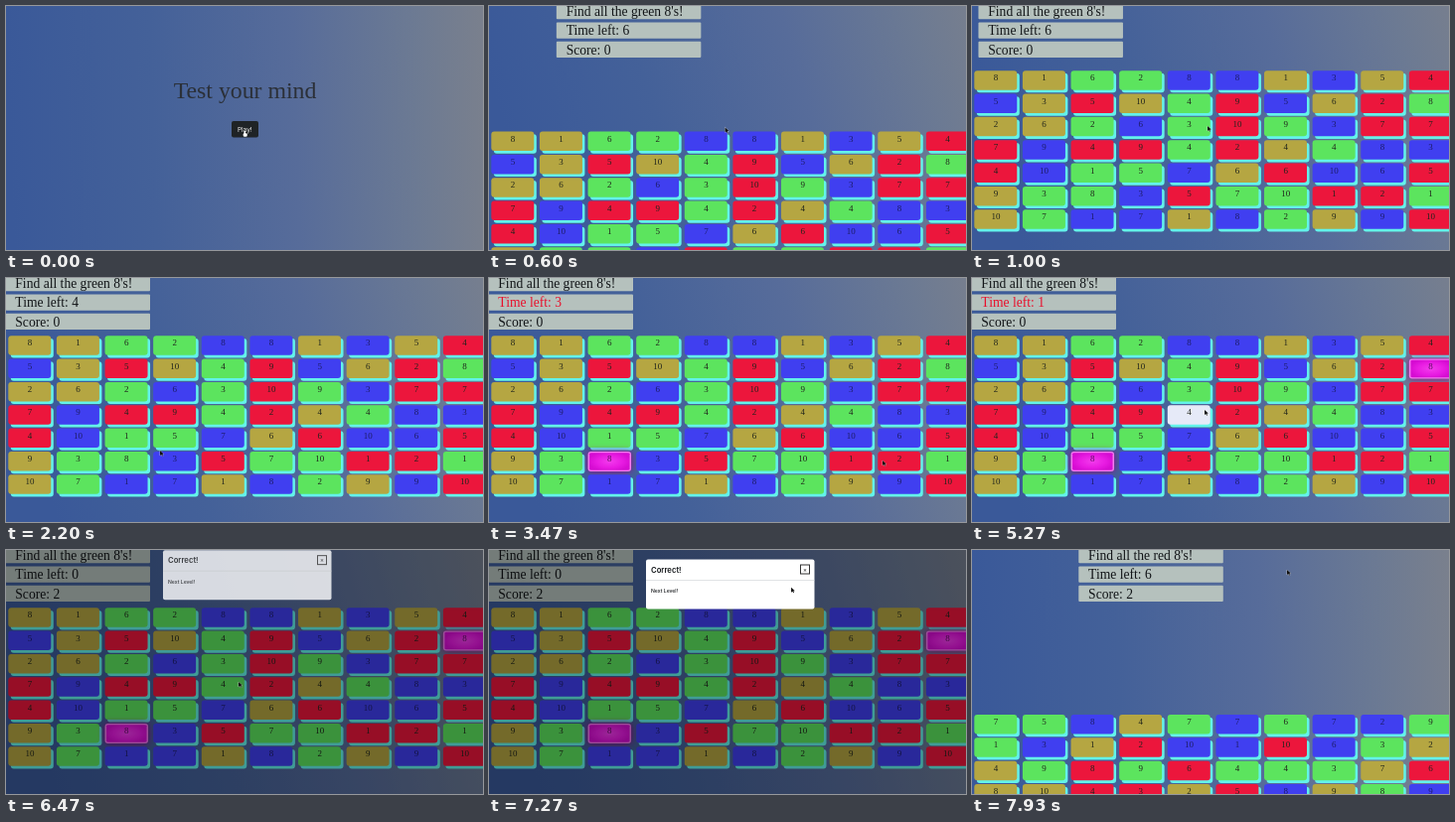
These frames come from a looping animation (480 px wide and 246 px high, 8000 ms). An HTML page with a canvas:

```html
<!DOCTYPE html>
<html lang="en">
<head>
<meta charset="utf-8">
<title>Test your mind</title>
<style>
html, body { margin: 0; width: 480px; height: 246px; overflow: hidden; background: #4a669d; }
canvas { display: block; }
</style>
</head>
<body>
<canvas id="stage" width="480" height="246"></canvas>
<script>
const ctx = document.getElementById('stage').getContext('2d');
const SERIF = '"Liberation Serif", serif', SANS = 'Inter, sans-serif';
const COLORS = { y: '#b5a642', g: '#5ce45e', r: '#ec163c', b: '#403ff0' };
const START = 255, END = 6200, POPUP = 6350, CLOSE = 7550, NEXT = 7700;

// Each card is a digit (0 stands for 10) and a colour letter.
const LEVELS = [
  ['8y1y6g2g8b8b1y3b5y4r', '5b3y5r0y4g9r5b6y2r8g', '2y6y2g6b3g0r9g3b7r7r',
   '7r9b4r9r4g2r4y4g8b3b', '4r0b1g5g7b6y6r0b6b5r', '9y3g8g3b5r7g0g1r2r1g',
   '0y7g1b7b1y8b2g9y9b0r'],
  ['7g5g8b4y7g7b6g7b2b9g', '1g3b1y2r0b1b0r6b3g2y', '4y9g8r9g6r4g4g3g7y6r',
   '8y0y4r3r2y5r8b9y8g9b']
];

// Pointer path: time, x, y
const PATH = [[0, 239, 126], [START, 239, 126], [800, 237, 121], [1300, 237, 121],
  [2200, 155, 174], [2420, 127, 186], [2750, 127, 186], [3470, 396, 184],
  [3850, 458, 90], [4430, 458, 90], [5200, 234, 133], [6850, 234, 133],
  [7430, 317, 20], [8000, 317, 20]];

const clamp = v => Math.max(0, Math.min(1, v));
const ramp = (t, from, len) => clamp((t - from) / len);

function bezier(x1, y1, x2, y2) {
  const at = (a, b, s) => 3 * a * s * (1 - s) ** 2 + 3 * b * s * s * (1 - s) + s ** 3;
  return x => {
    let lo = 0, hi = 1;
    for (let i = 0; i < 20; i++) {
      const mid = (lo + hi) / 2;
      if (at(x1, x2, mid) < x) lo = mid; else hi = mid;
    }
    return at(y1, y2, hi);
  };
}
const ease = bezier(.25, .1, .25, 1);
const easeOut = bezier(0, 0, .58, 1);
const easeInOut = bezier(.42, 0, .58, 1);

function rect(x, y, w, h, r, fill) {
  ctx.fillStyle = fill;
  ctx.beginPath();
  ctx.roundRect(x, y, w, h, r);
  ctx.fill();
}

function text(str, x, y, font, fill, align = 'left') {
  ctx.font = font;
  ctx.fillStyle = fill;
  ctx.textAlign = align;
  ctx.fillText(str, x, y);
}

function background(tilt) {
  const g = ctx.createLinearGradient(0, tilt, 480, -tilt);
  g.addColorStop(0, '#3a5999');
  g.addColorStop(.3, '#446199');
  g.addColorStop(.6, '#576c9a');
  g.addColorStop(.85, '#6c7a93');
  g.addColorStop(1, '#7a808d');
  ctx.fillStyle = g;
  ctx.fillRect(0, 0, 480, 246);
}

function intro() {
  text('Test your mind', 240.5, 93, '23.8px ' + SERIF, '#2b3038', 'center');
  rect(227, 116, 27, 16.5, 2, '#1f2326');
  text('Play!', 240.3, 126.5, '6.5px ' + SANS, '#f4f4f4', 'center');
}

function card(x, y, num, color, state) {
  if (state === 'picked') {
    ctx.save();
    ctx.shadowColor = '#a0008c';
    ctx.shadowBlur = 7;
    rect(x, y, 43.5, 20, 3, '#f27cee');
    ctx.restore();
    const g = ctx.createRadialGradient(0, 0, 0, 0, 0, 1);
    g.addColorStop(0, '#f23cec');
    g.addColorStop(.6, '#e81ce2');
    g.addColorStop(1, '#d60cd2');
    ctx.save();
    ctx.translate(x + 21.75, y + 10);
    ctx.scale(21.5, 10);
    rect(-.94, -.88, 1.88, 1.76, .1, g);
    ctx.restore();
  } else {
    rect(x + 2.5, y + 2.7, 43, 19.5, 3, '#63f3ea');
    rect(x, y, 43, 19.5, 3, state === 'wrong' ? '#e6eaf8' : COLORS[color]);
  }
  const ink = state === 'picked' ? '#5c1060' : color === 'b' ? '#1c1c66' : '#20241c';
  text(num === '0' ? '10' : num, x + 21.7, y + 10, '9px ' + SERIF, ink, 'center');
}

function board(t, level) {
  const slide = 170 * (1 - ease(ramp(t, level ? NEXT : START, 1000)));
  const left = level ? 6 : t < END ? 6 - Math.max(0, Math.floor((t - 175) / 1011)) : 0;
  const score = t < END ? 0 : 2;
  const lines = [`Find all the ${level ? 'red' : 'green'} 8's!`, 'Time left: ' + left, 'Score: ' + score];

  lines.forEach((line, i) => {
    const y = -3 + i * 19.4;
    rect(slide - .5, y, 145.5, 16.3, 1, '#b5c1bd');
    const urgent = i === 1 && left > 0 && left < 4;
    text(line, slide + 9.3, y + 13, '13.6px ' + SERIF, urgent ? '#e8102c' : '#121518');
  });

  LEVELS[level].forEach((row, r) => {
    for (let c = 0; c < 10; c++) {
      const picked = !level && (r === 5 && c === 2 && t > 2500 || r === 1 && c === 9 && t > 3930);
      const wrong = !level && r === 3 && c === 4 && t > 5230 && t < END;
      card(2.3 + c * 48.62, 58.2 + slide + r * 23.35, row[2 * c], row[2 * c + 1],
        picked ? 'picked' : wrong ? 'wrong' : '');
    }
  });
}

function modal(t) {
  const shade = ramp(t, END, 150) - ramp(t, NEXT, 150);
  ctx.fillStyle = `rgba(0,0,0,${.36 * shade})`;
  ctx.fillRect(0, 0, 480, 246);

  const alpha = ramp(t, POPUP, 150) - ramp(t, CLOSE, 140);
  if (alpha <= 0) return;
  const shown = easeOut(ramp(t, POPUP, 300)) - easeOut(ramp(t, CLOSE, 300));
  ctx.save();
  ctx.globalAlpha = alpha;
  ctx.translate(158, 9.5 - 22 * (1 - shown));
  rect(0, 0, 169.5, 50, 2, '#fff');
  rect(0, 20.7, 169.5, .6, 0, '#c4c8cc');
  text('Correct!', 5, 13.3, '600 7.7px ' + SANS, '#15181b');
  text('Next Level!', 5, 33.8, '500 5.1px ' + SANS, '#15181b');
  ctx.strokeStyle = '#333';
  ctx.lineWidth = 1;
  ctx.strokeRect(155.5, 5.5, 9, 9);
  text('×', 160, 12, '6px ' + SANS, '#222', 'center');
  ctx.restore();
}

function pointer(t) {
  const i = PATH.findIndex(p => p[0] > t);
  const [t0, x0, y0] = PATH[i - 1], [t1, x1, y1] = PATH[i];
  const k = easeInOut((t - t0) / (t1 - t0));
  ctx.save();
  ctx.translate(x0 + (x1 - x0) * k, y0 + (y1 - y0) * k);
  if (t < START) {
    rect(.5, 0, 1.5, 4, .7, '#fff');
    rect(-.3, 2.3, 4, 3.4, 1.2, '#fff');
  } else {
    ctx.beginPath();
    [[0, 0], [0, 5], [1.3, 4], [2.2, 5.7], [3, 5.3], [2.2, 3.7], [3.8, 3.6]].forEach(p => ctx.lineTo(...p));
    ctx.closePath();
    ctx.strokeStyle = 'rgba(255,255,255,.6)';
    ctx.lineWidth = .8;
    ctx.stroke();
    ctx.fillStyle = '#111';
    ctx.fill();
  }
  ctx.restore();
}

function draw(now) {
  const t = now % 8000;
  const level = t < NEXT ? 0 : 1;
  background(t < START || level ? 8 : 70);
  if (t < START) intro();
  else board(t, level);
  if (t >= END) modal(t);
  pointer(t);
  requestAnimationFrame(() => draw(performance.now()));
}
draw(performance.now());
</script>
</body>
</html>
```
